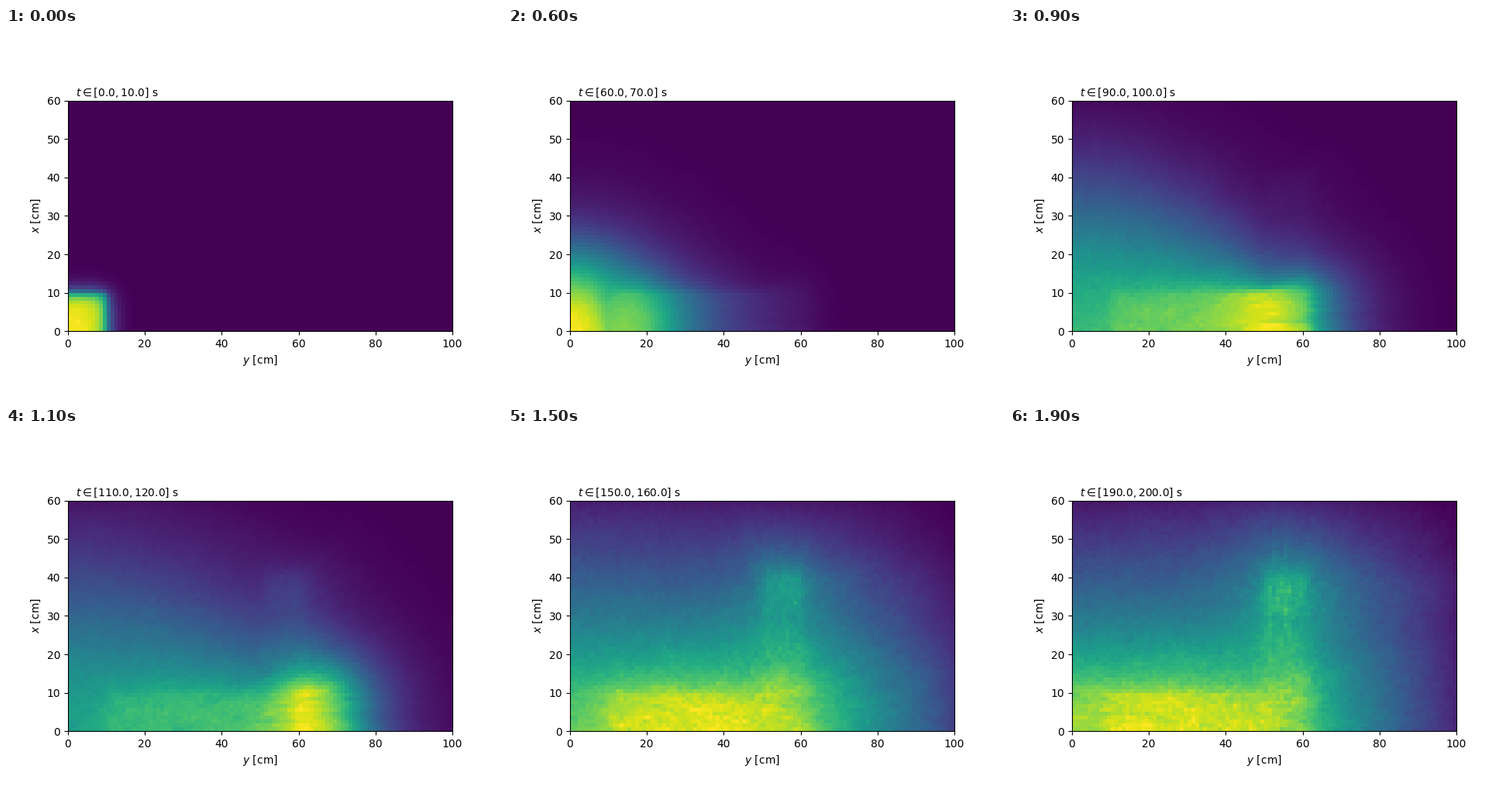
A matplotlib script that plays this animation: 640x480 px, repeating every 2 s.

```python
import numpy as np
import matplotlib.pyplot as plt
from matplotlib.animation import FuncAnimation

NX, NY, NZ = 60, 100, 60      # domain [cm]
PAD = 12                      # absorbing rim around the domain
FRAMES, BIN, PULSE = 20, 10.0, 5
COUNT, DT = 300_000, 0.5      # particles, time step [s] at 1 cm/s
SIGMA, SIGMA_VOID = 0.05, 5e-5

rng = np.random.default_rng(7)


def build_medium():
    """Material id per cell: 0 absorber, 1 duct, 2 outside."""
    cells = np.full((NX + PAD, NY + PAD, NZ + PAD), 2, np.uint8)
    cells[:NX, :NY, :NZ] = 0
    cells[0:10, 10:60, 0:10] = 1
    cells[10:40, 50:60, 0:10] = 1
    cells[30:40, 50:60, 10:40] = 1
    cells[30:40, 60:100, 30:40] = 1
    return cells


def directions(n):
    mu = rng.uniform(-1, 1, n)
    phi = rng.uniform(0, 2 * np.pi, n)
    s = np.sqrt(1 - mu * mu)
    return np.array([s * np.cos(phi), s * np.sin(phi), mu], np.float32)


def comb(weight):
    """Indices of COUNT equally weighted survivors, and their weight."""
    total = np.cumsum(weight, dtype=float)
    share = total[-1] / COUNT
    picks = (np.arange(COUNT) + rng.random()) * share
    return np.minimum(np.searchsorted(total, picks), COUNT - 1), share


def simulate():
    """Flux per time bin for a source lasting one bin."""
    medium = build_medium()
    _, sy, sz = medium.shape
    columns = medium.shape[0] * sy
    medium = medium.ravel()
    keep = np.exp(-DT * np.array([SIGMA, SIGMA_VOID, 1e4])).astype(np.float32)
    scatter = 1 - np.exp(-DT * np.array([SIGMA, SIGMA_VOID, 0]))
    scatter = scatter.astype(np.float32)

    # Mirror planes at zero: move freely, look cells up by absolute position
    way = directions(COUNT)
    pos = rng.uniform(-10, 10, (3, COUNT)).astype(np.float32) + way * (DT / 2)
    weight = np.ones(COUNT, np.float32)
    flux = np.zeros((FRAMES + 1, columns))
    per_bin = int(BIN / DT)

    for n in range(FRAMES * per_bin):
        ix, iy, iz = np.abs(pos).astype(np.int32)
        column = ix * sy + iy
        kind = medium[column * sz + iz]
        weight *= keep[kind]

        k, part = divmod((n + 0.5) / per_bin, 1)
        hist = np.bincount(column, weight, columns)
        flux[int(k)] += (1 - part) * hist
        flux[int(k) + 1] += part * hist

        hit = np.flatnonzero(rng.random(COUNT, np.float32) < scatter[kind])
        way[:, hit] = directions(hit.size)
        if (n + 1) % per_bin == 0:
            pick, share = comb(weight)
            pos, way = pos[:, pick], way[:, pick]
            weight = np.full(COUNT, share, np.float32)
        pos += way * DT
    return flux[:FRAMES].reshape(FRAMES, -1, sy)[:, :NX, :NY]


response = simulate()
flux = [response[max(0, k - PULSE + 1):k + 1].sum(axis=0) for k in range(FRAMES)]

fig, ax = plt.subplots(figsize=(6.4, 4.8), dpi=100)
mesh = ax.pcolormesh(np.arange(NY + 1), np.arange(NX + 1), flux[0], cmap="viridis")
ax.set_aspect("equal")
ax.set_xlabel("$y$ [cm]")
ax.set_ylabel("$x$ [cm]")
label = ax.text(0.02, 1.02, "", transform=ax.transAxes)


def draw(k):
    mesh.set_array(flux[k])
    mesh.set_clim(flux[k].min(), flux[k].max())
    label.set_text(r"$t \in [%.1f,%.1f]$ s" % (k * BIN, (k + 1) * BIN))
    return mesh, label


anim = FuncAnimation(fig, draw, frames=FRAMES, interval=100,
                     init_func=lambda: draw(0), repeat=True, repeat_delay=0)
plt.show()
```
